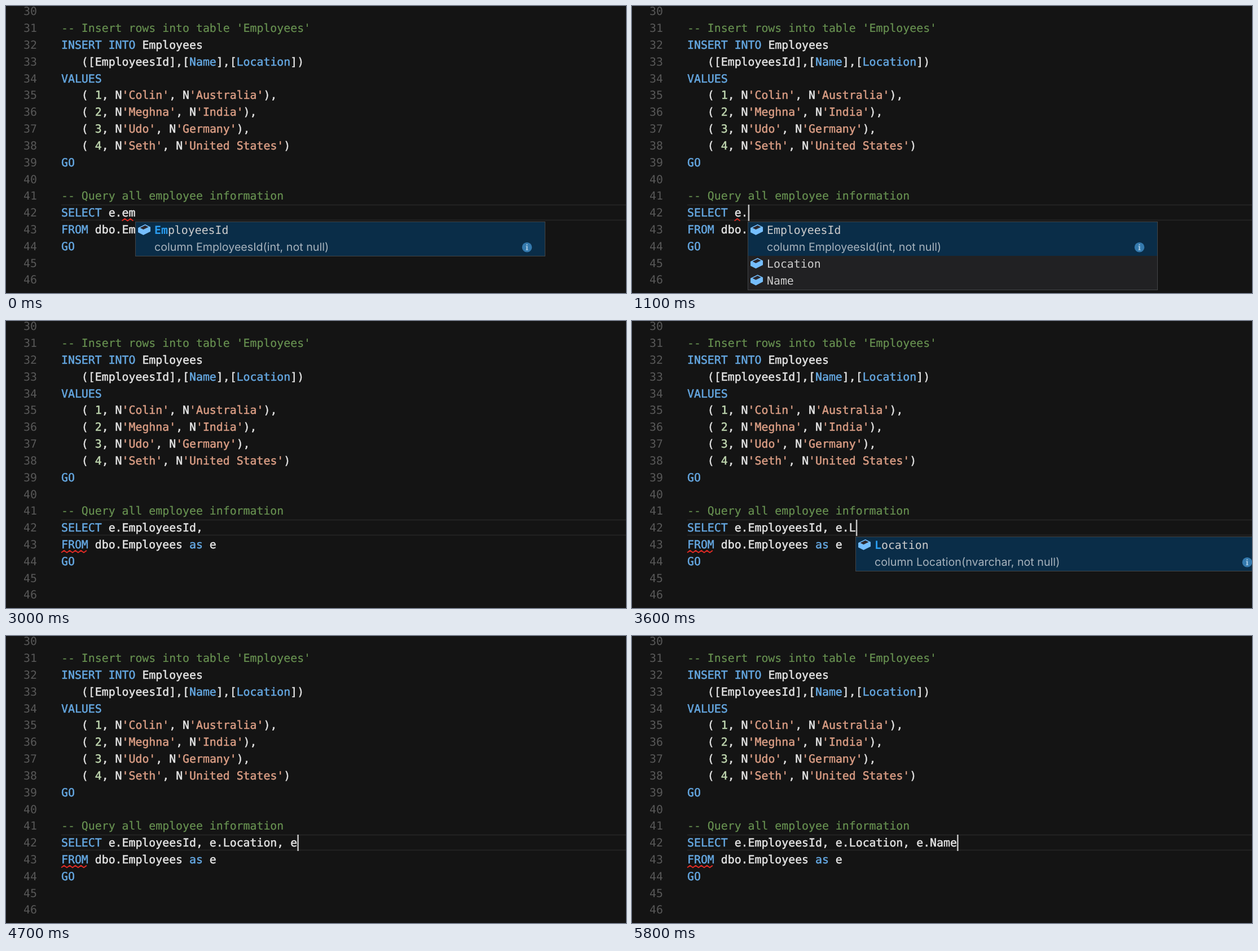
An HTML page for the animation above (6300 ms loop, 1099x510 px).

```html
<!DOCTYPE html>
<html lang="en">
<head>
<meta charset="utf-8">
<title>SQL completion</title>
<style>
html, body { margin: 0; width: 100%; height: 100%; overflow: hidden; background: #141414; }
svg { display: block; }
text { font: 19.85px "DejaVu Sans Mono", "Liberation Mono", monospace; color: #e4e4e4;
  fill: currentColor; white-space: pre; text-rendering: geometricPrecision; }
tspan { fill: currentColor; }
.code { stroke-width: .5; }
.code, .code tspan { stroke: currentColor; }
.num { color: #585858; }
.key { color: #65a8e2; }
.str { color: #da9d84; }
.lit { color: #c0d7b0; }
.code .com { color: #689251; stroke-width: .2; }
.item { color: #cdcdcd; }
.hit { color: #2a9df0; font-weight: bold; }
.detail { font: 19.7px Inter, "Liberation Sans", sans-serif; color: #a7b3bd; }
.info { font: bold 14px "Noto Serif", "Liberation Serif", serif; color: #a9cbe4; text-anchor: middle; }
</style>
</head>
<body>
<svg id="stage" width="1099" height="510" viewBox="0 0 1099 510"></svg>
<script>
const LOOP = 6300, COL = 11.95, ROW = 29.83, LEFT = 98, BASE = 6.6;
const stage = document.getElementById('stage');
const colX = c => LEFT + c * COL;
const lineY = n => 9.6 + (n - 30) * ROW;

function add(parent, tag, attrs, text) {
  const el = document.createElementNS('http://www.w3.org/2000/svg', tag);
  for (const k in attrs) el.setAttribute(k, attrs[k]);
  if (text) el.textContent = text;
  parent.appendChild(el);
  return el;
}

const TOKENS = /--.*|'[^']*'|\b\d\b|\b(?:INSERT|INTO|VALUES|GO|SELECT|FROM|as)\b|(?<=\[)(?:Name|Location)(?=\])/g;
const kind = s => s.startsWith('--') ? 'com' : s[0] === "'" ? 'str' : /\d/.test(s) ? 'lit' : 'key';

function drawCode(parent, n, src) {
  const body = src.trimStart();
  const t = add(parent, 'text', { x: colX(src.length - body.length), y: lineY(n) + BASE, class: 'code' });
  let at = 0;
  for (const m of body.matchAll(TOKENS)) {
    if (m.index > at) add(t, 'tspan', {}, body.slice(at, m.index));
    add(t, 'tspan', { class: kind(m[0]) }, m[0]);
    at = m.index + m[0].length;
  }
  if (at < body.length) add(t, 'tspan', {}, body.slice(at));
}

function drawSquiggle(parent, n, from, len) {
  const y = lineY(n) + 12.3, step = 4.98, end = colX(from + len);
  let d = '';
  for (let x = colX(from), i = 0; x <= end; x += step, i++)
    d += (i ? 'L' : 'M') + x + ' ' + (y + (i % 2 ? -1.8 : 1.8));
  add(parent, 'path', { d, fill: 'none', stroke: '#dd2a24', 'stroke-width': 1.9, 'stroke-linejoin': 'round' });
}

function drawIcon(parent, x, y) {
  const g = add(parent, 'g', { transform: `translate(${x} ${y}) scale(1.57)` });
  add(g, 'path', { d: 'M9 1L1 5v5l6 3 8-4V4z', fill: '#75beff' });
  add(g, 'path', { d: 'M9 2.118L3.236 5 7 6.882 12.764 4z', fill: '#2b282e' });
}

const DETAILS = {
  EmployeesId: 'column EmployeesId(int, not null)',
  Location: 'column Location(nvarchar, not null)',
  Name: 'column Name(nvarchar, not null)'
};

// First item is selected and shows its detail row.
function drawPopup(parent, x, items, hit) {
  const h = 62 + (items.length - 1) * 30;
  add(parent, 'rect', { x: x + .5, y: 383.5, width: 726, height: h - 1, fill: '#212123', stroke: '#424446' });
  add(parent, 'rect', { x: x + 1, y: 384, width: 725, height: 60, fill: '#0a2d48' });
  items.forEach((name, i) => {
    const y = 398.5 + (i ? i + 1 : 0) * ROW;
    drawIcon(parent, x + 3.5, y - 12);
    const t = add(parent, 'text', { x: x + 34, y: y + BASE, class: 'item' });
    const n = i ? 0 : hit;
    if (n) add(t, 'tspan', { class: 'hit' }, name.slice(0, n));
    add(t, 'tspan', {}, name.slice(n));
  });
  add(parent, 'text', { x: x + 34, y: 435.3, class: 'detail' }, DETAILS[items[0]]);
  add(parent, 'circle', { cx: x + 694.5, cy: 428.7, r: 8.8, fill: '#3479ad' });
  add(parent, 'text', { x: x + 694.5, y: 433.6, class: 'info' }, 'i');
}

const CODE = [
  '',
  "-- Insert rows into table 'Employees'",
  'INSERT INTO Employees',
  '   ([EmployeesId],[Name],[Location])',
  'VALUES',
  "   ( 1, N'Colin', N'Australia'),",
  "   ( 2, N'Meghna', N'India'),",
  "   ( 3, N'Udo', N'Germany'),",
  "   ( 4, N'Seth', N'United States')",
  'GO', '',
  '-- Query all employee information',
  '',
  'FROM dbo.Employees as e',
  'GO', '', ''
];

add(stage, 'rect', { width: 1099, height: 510, fill: '#141414' });
for (const y of [353.5, 380.5])
  add(stage, 'rect', { x: LEFT, y: y - 1, width: 1001, height: 2, fill: '#232323' });
CODE.forEach((src, i) => {
  add(stage, 'text', { x: 31, y: lineY(30 + i) + BASE, class: 'num' }, String(30 + i));
  if (src) drawCode(stage, 30 + i, src);
});
const live = add(stage, 'g', {});

const ALL = Object.keys(DETAILS);
const ID = 'e.EmployeesId', LOC = ID + ', e.Location';
// start ms, typed text, caret, popup items, matched letters, popup x
const STEPS = [
  [0, 'e.em', 0, ['EmployeesId'], 2],
  [300, 'e.em', 1, ['EmployeesId'], 2],
  [400, 'e.e', 1, ['EmployeesId'], 1],
  [600, 'e.', 1],
  [700, 'e.', 1, ALL, 0],
  [1200, 'e.', 0, ALL, 0],
  [1500, 'e.E', 1, ['EmployeesId'], 1],
  [1700, 'e.Em', 1, ['EmployeesId'], 2],
  [2000, 'e.Emp', 1, ['EmployeesId'], 3, 232],
  [2200, 'e.Empl', 1, ['EmployeesId'], 4],
  [2400, ID, 1],
  [2500, ID + ',', 1],
  [3000, ID + ',', 0],
  [3100, ID + ', ', 1],
  [3200, ID + ', e', 1],
  [3400, ID + ', e.', 1, ALL, 0],
  [3600, ID + ', e.L', 1, ['Location'], 1],
  [3700, ID + ', e.Lo', 1, ['Location'], 2],
  [3900, LOC, 1],
  [4300, LOC + ',', 1],
  [4400, LOC + ', ', 1],
  [4600, LOC + ', e', 1],
  [4800, LOC + ', e.', 1, ALL, 0],
  [5200, LOC + ', e.N', 1, ['Name'], 1],
  [5400, LOC + ', e.Na', 1, ['Name'], 2],
  [5700, LOC + ', e.Name', 1]
];
// start ms, line, column, length
const ERRORS = [[0, 42, 9, 2], [400, 42, 9, 1], [600, 42, 7, 1], [1700, 43, 0, 4]];
const current = (table, t) => table.filter(s => s[0] <= t).pop();

let shown;
function render(t) {
  const step = current(STEPS, t);
  if (step === shown) return;
  shown = step;
  live.replaceChildren();
  const [, typed, caret, items, hit, px] = step;
  const end = 7 + typed.length;
  drawCode(live, 42, 'SELECT ' + typed);
  drawSquiggle(live, ...current(ERRORS, t).slice(1));
  if (caret) add(live, 'rect', { x: colX(end) + .1, y: 353, width: 2.5, height: 29, fill: '#c4c4c4' });
  if (items) drawPopup(live, px || Math.round(colX(end) - .3), items, hit);
}

const start = performance.now();
function tick() {
  render((performance.now() - start) % LOOP);
  requestAnimationFrame(tick);
}
render(0);
requestAnimationFrame(tick);
</script>
</body>
</html>
```
